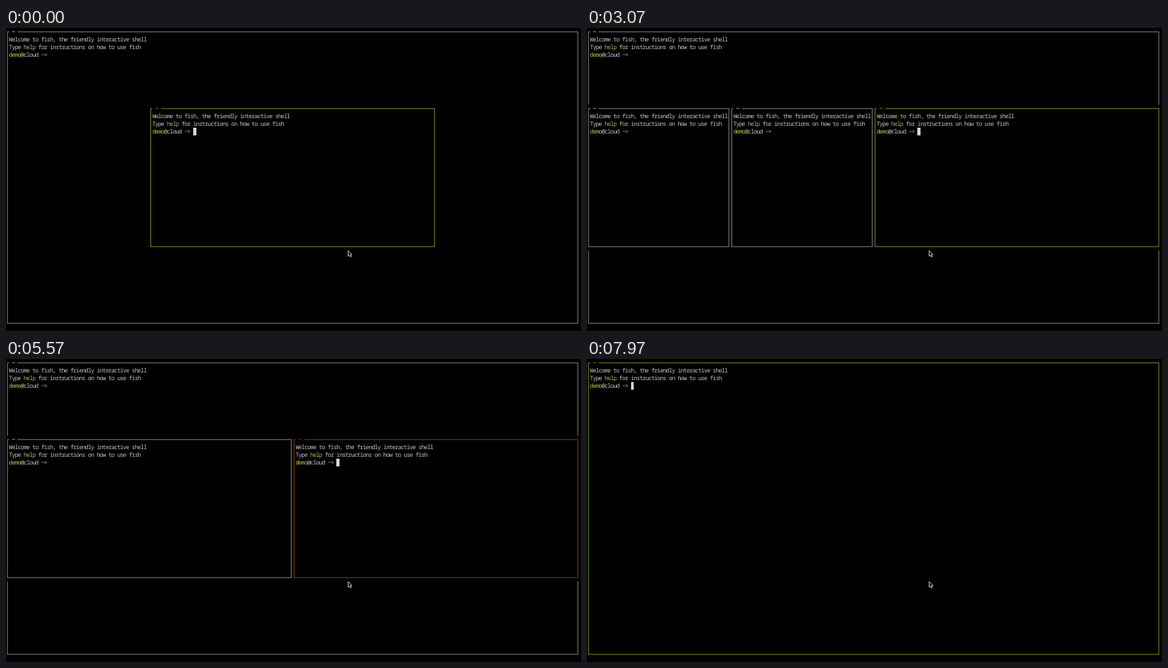
Recreate the animation shown at these times as an HTML page. Size 900 by 474 pixels, loop 8 s.

```html
<!DOCTYPE html>
<html lang="en">
<head>
<meta charset="utf-8">
<title>Floating terminal panes</title>
<style>
  :root { --cell: 4.578px; --row: 12px; }
  html, body { margin: 0; width: 100%; height: 100%; overflow: hidden; background: #000; }
  #stage { position: relative; width: 900px; height: 474px; overflow: hidden; background: #000; }
  .pane {
    --frame: #9a9a94;
    position: absolute;
    inset: 0;
    color: #c4c4c6;
    font: 9.1px/12px "Noto Sans Mono", "DejaVu Sans Mono", monospace;
    font-stretch: extra-condensed;
    letter-spacing: calc(var(--cell) - 1ch);
    text-rendering: geometricPrecision;
    white-space: pre;
  }
  .pane.active { --frame: #84ae18; }
  .pane.active.prompting { --frame: #9c480c; }
  .pane[hidden] { display: none; }
  .pane svg { position: absolute; left: 0; top: 0; }
  .frame { fill: none; stroke: var(--frame); stroke-width: 0.94; }
  .title, .text, .cursor {
    position: absolute;
    left: calc(var(--left) + var(--cell));
    top: calc(var(--top) + var(--row));
  }
  .title {
    top: var(--top); height: var(--row); width: calc(var(--cell) * 3);
    background: #000; color: #d0d0cc; font-weight: bold;
  }
  .active .title { color: var(--frame); }
  .starting .text { visibility: hidden; }
  .help { color: #a9b84e; }
  .user { color: #b9c63c; }
  .cursor { display: none; width: var(--cell); height: var(--row); background: #d6d6d0; }
  .active .cursor { display: block; }
  .pane:not(.starting) .cursor {
    left: calc(var(--left) + var(--cell) * 15);
    top: calc(var(--top) + var(--row) * 3);
  }
  #pointer { position: absolute; z-index: 1; left: 534px; top: 347px; }
</style>
</head>
<body>
<div id="stage">
  <svg id="pointer" width="9" height="13">
    <path d="M1.5 1.2V10L3.6 8.2 5 11.3 6.4 10.6 5.1 7.7H7.6Z" fill="#000" stroke="#d8d8d8"/>
  </svg>
</div>
<script>
const CELL = 4.578, ROW = 12, DURATION = 8000;
const stage = document.getElementById('stage');

// Column spans of the floating panes, by how many are open.
const LAYOUTS = [
  [],
  [[49, 146]],
  [[0, 97], [98, 195]],
  [[0, 48], [49, 97], [98, 195]]
];

// time, open floating panes, mode
const TIMELINE = [
  [0, 1, ''],
  [300, 1, 'prompting'],
  [820, 2, 'starting'],
  [950, 2, ''],
  [1850, 2, 'prompting'],
  [2370, 3, 'starting'],
  [2500, 3, ''],
  [3600, 3, 'prompting'],
  [4130, 2, ''],
  [5200, 2, 'prompting'],
  [5770, 1, ''],
  [6750, 1, 'prompting'],
  [7330, 0, '']
];

function createPane() {
  const pane = document.createElement('div');
  pane.innerHTML = '<svg width="900" height="474"><rect class="ground"/><rect class="frame"/></svg>' +
    '<div class="title"> ~ </div>' +
    '<div class="text">Welcome to fish, the friendly interactive shell\n' +
    'Type <span class="help">help</span> for instructions on how to use fish\n' +
    '<span class="user">demo</span>@cloud ~&gt; </div><div class="cursor"></div>';
  stage.append(pane);
  return pane;
}

function setRect(rect, x, y, width, height) {
  for (const [name, value] of Object.entries({ x, y, width, height })) rect.setAttribute(name, value);
}

// Frame lines run through the middle of the outermost cells.
function placePane(pane, [first, last], top, bottom) {
  const x = first * CELL, y = top * ROW;
  const width = (last - first) * CELL, height = (bottom - top) * ROW;
  setRect(pane.querySelector('.ground'), x, y, width + CELL, height + ROW);
  setRect(pane.querySelector('.frame'), x + CELL / 2, y + ROW / 2, width, height);
  pane.style.setProperty('--left', x + 'px');
  pane.style.setProperty('--top', y + 'px');
}

const tiled = createPane();
const floating = [createPane(), createPane(), createPane()];
placePane(tiled, [0, 195], 0, 38);

let shown;
function render(state) {
  const [, count, mode] = state;
  tiled.className = count ? 'pane' : 'pane active';
  floating.forEach((pane, i) => {
    pane.hidden = i >= count;
    pane.className = i === count - 1 ? `pane active ${mode}` : 'pane';
    if (i < count) placePane(pane, LAYOUTS[count][i], 10, 28);
  });
}

const start = performance.now();
function tick() {
  const time = (performance.now() - start) % DURATION;
  const state = TIMELINE.findLast(([from]) => from <= time);
  if (state !== shown) render(shown = state);
  requestAnimationFrame(tick);
}
tick();
</script>
</body>
</html>
```
